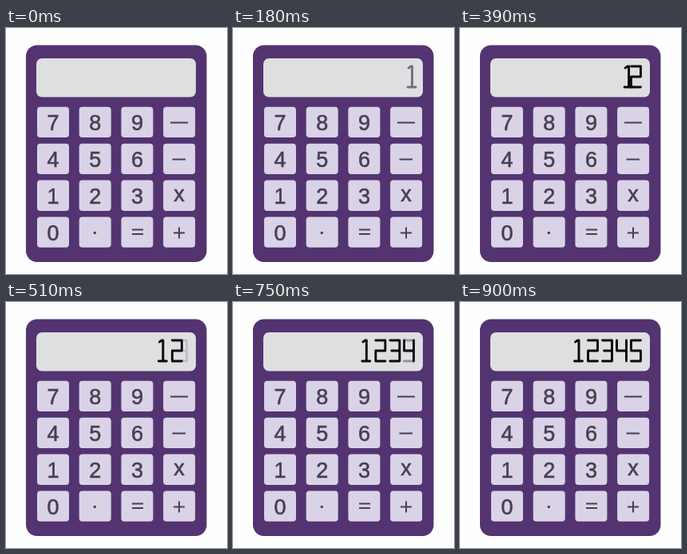
Write an HTML page that moves like this. It is 277 px wide and 308 px high and loops after 1.17 s.

```html
<!DOCTYPE html>
<html lang="en">
<head>
<meta charset="utf-8">
<title>Calculator</title>
<style>
  html, body { margin: 0; height: 100%; overflow: hidden; background: #fefefe; }
  svg { display: block; width: 100%; height: 100%; }
  text { font: 27px "Liberation Sans", Arial, sans-serif; text-anchor: middle; fill: #493f50; stroke: #493f50; stroke-width: .6; }
  .signs { fill: none; stroke: #493f50; stroke-width: 2; }
  #digits { fill: none; stroke-width: 2.9; stroke-linecap: round; stroke-linejoin: round; }
</style>
</head>
<body>
<svg id="stage" viewBox="0 0 277 308">
  <rect x="25" y="21.5" width="226.5" height="271.5" rx="14" fill="#533471"/>
  <rect x="38" y="38" width="200" height="48.5" rx="7" fill="#dfdfe1"/>
  <g id="keys"></g>
  <path class="signs" d="M206 118.5H228M208.5 164.5H225M158 252.5H172M158 258H172M210 256.5H224M217 249.5V263.5"/>
  <circle cx="111.3" cy="256.5" r="1.7" fill="#493f50"/>
  <g id="digits"></g>
</svg>
<script>
const LOOP = 1170, PITCH = 18, SPEED = 0.123, SLIDE_END = 900;

// Segment glyphs, centred on x = 0, with the span of their fade-in
const digits = [
  { d: "M-4 50L-1 48H.5V74M-5 74H5", from: 60, to: 270, rest: 224 },
  { d: "M-6 48H6V61H-6V74H6", from: 270, to: 390, rest: 220.5 },
  { d: "M-6 48H6V74H-6M-4 61H6", from: 495, to: 585, rest: 220.5 },
  { d: "M-6 48V61H6M6 48V74", from: 570, to: 640, rest: 220.5 },
  { d: "M6 48H-6V61H6V74H-6", from: 690, to: 840, rest: 220.5 }
];

function add(parent, tag, attrs, label = "") {
  const el = document.createElementNS("http://www.w3.org/2000/svg", tag);
  for (const name in attrs) el.setAttribute(name, attrs[name]);
  el.textContent = label;
  document.getElementById(parent).append(el);
  return el;
}

["789 ", "456 ", "123x", "0   "].forEach((row, r) => {
  [...row].forEach((label, c) => {
    const x = 39 + 52.7 * c, y = 98.8 + 45.9 * r;
    add("keys", "rect", { x, y, width: 40, height: 38.3, rx: 4, fill: "#dad2e6" });
    if (label !== " ") add("keys", "text", { x: x + 20, y: y + (label === "x" ? 26.5 : 29.5) }, label);
  });
});

for (const digit of digits) digit.el = add("digits", "path", { d: digit.d });

function draw(now) {
  const t = now % LOOP;
  const shift = SPEED * Math.max(0, SLIDE_END - t);
  digits.forEach(({ el, from, to, rest }, i) => {
    const a = Math.min(1, Math.max(0, (t - from) / (to - from)));
    const x = Math.min(rest, 148.5 + PITCH * i + shift);
    el.setAttribute("transform", `translate(${x} 0)`);
    el.setAttribute("opacity", a);
    el.setAttribute("stroke", `hsl(265 ${30 * (1 - a)}% ${4 + 24 * (1 - a)}%)`);
  });
}

const start = performance.now();
function tick() {
  draw(performance.now() - start);
  requestAnimationFrame(tick);
}
tick();
</script>
</body>
</html>
```
